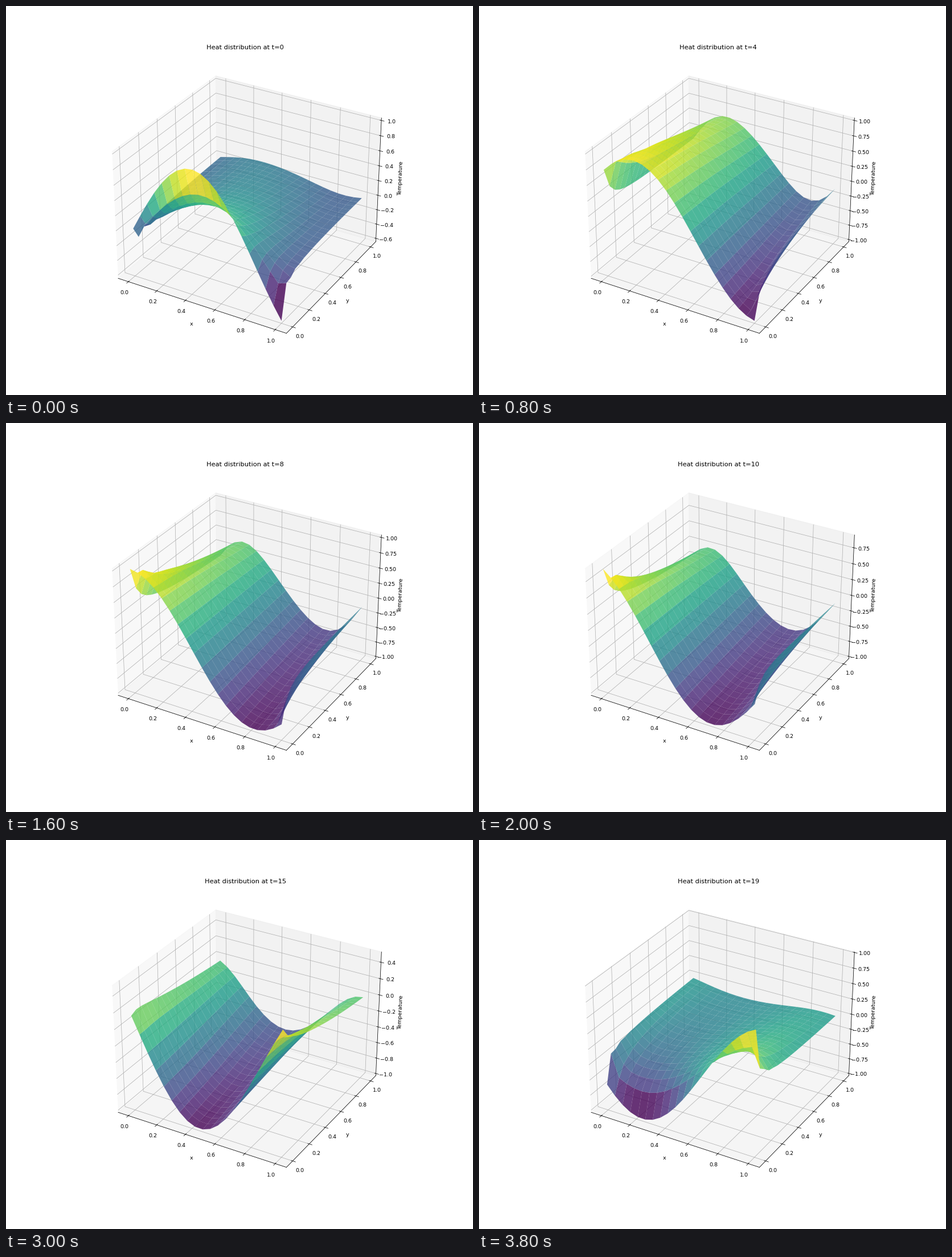
A matplotlib script for the animation above (4000 ms loop, 820 px wide and 683 px high).

```python
import numpy as np
import matplotlib.pyplot as plt
from matplotlib.animation import FuncAnimation

N = 20            # grid points per axis, and frames per loop
STEP = 0.2        # phase step of the wave per cell
ALPHA = 0.2       # diffusion number
DPI = 820 / 12


def laplacian(u):
    """Five-point Laplacian on a periodic grid."""
    return sum(np.roll(u, s, axis=a) for s in (1, -1) for a in (0, 1)) - 4 * u


def solve():
    """Diffuse a diagonal sine wave; result is indexed [y, t, x]."""
    i = np.arange(N)
    u = np.sin(STEP * (i[:, None] + i[None, :]))
    layers = [u]
    for _ in range(N - 1):
        u = u + ALPHA * laplacian(u)
        layers.append(u)
    return np.array(layers)


heat = solve()
axis = np.linspace(0, 1, N)
X, Y = np.meshgrid(axis, axis)

fig = plt.figure(figsize=(12, 683 / DPI + 1e-9), dpi=DPI)
ax = fig.add_subplot(projection="3d")


def draw(t):
    ax.clear()
    ax.plot_surface(X, Y, heat[:, t, :], cmap="viridis", alpha=0.8)
    ax.set_title(f"Heat distribution at t={t}")
    ax.set_xlabel("x")
    ax.set_ylabel("y")
    ax.set_zlabel("Temperature")
    return []


anim = FuncAnimation(fig, draw, frames=N, interval=200, repeat=True,
                     repeat_delay=0, blit=False)
plt.show()
```
